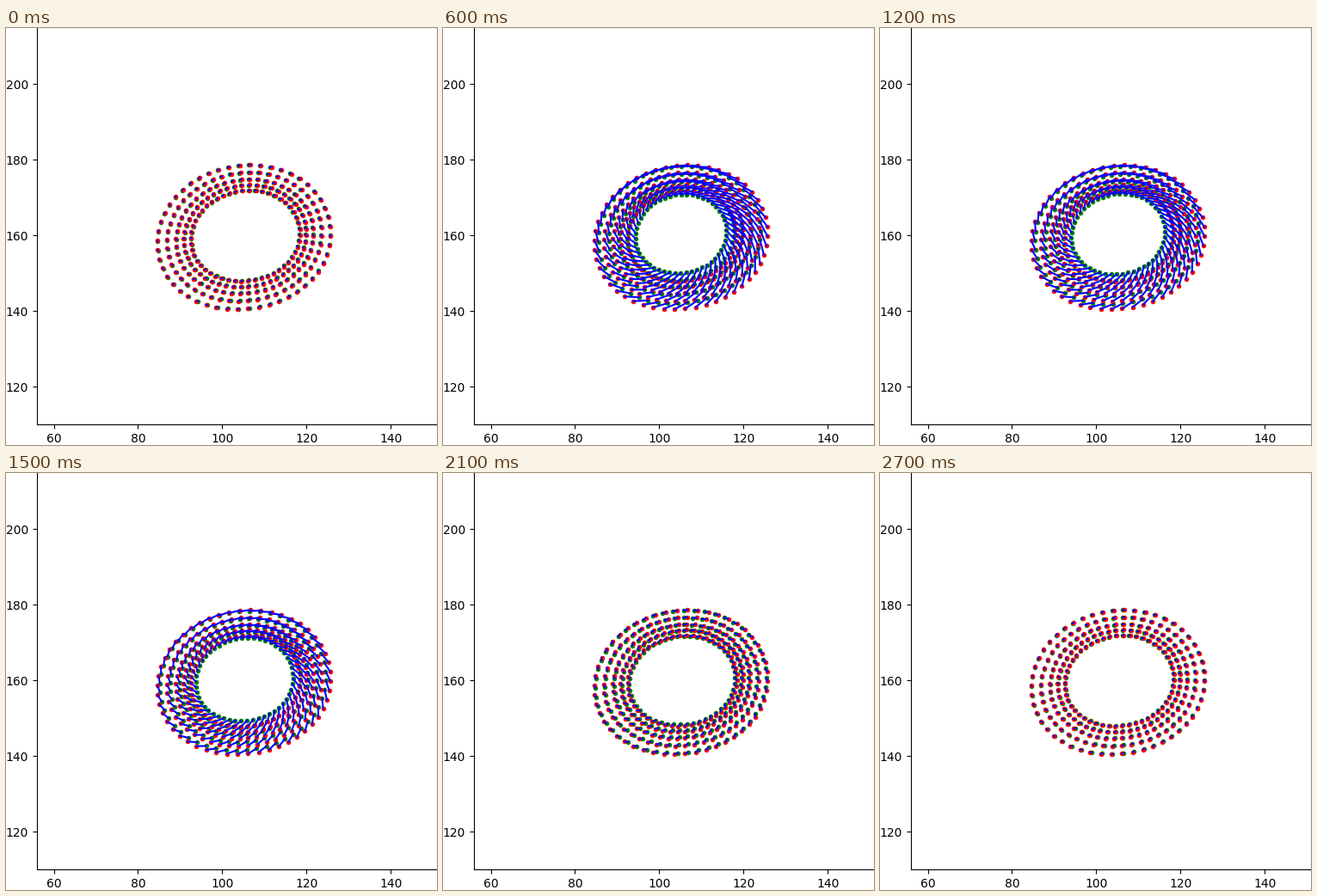
Recreate the animation shown at these times as a matplotlib script. Size 501 by 485 pixels, loop 2850 ms.

```python
import numpy as np
import matplotlib.pyplot as plt
from matplotlib.animation import FuncAnimation
from matplotlib.collections import LineCollection

W, H, DPI = 501, 485, 100
FRAMES, INTERVAL = 19, 150
LEFT, BOTTOM, AX_W, AX_H = 36, 23.7, 465, 462
X_LIM, Y_LIM = (56, 151), (110, 215)

# Outer wall contour in stage pixels, clockwise from the top.
CONTOUR = np.array([
    283.8 + 159j, 342.2 + 175.7j, 374.8 + 220j, 368.8 + 274.5j, 327.8 + 313j,
    269.3 + 327j, 210.8 + 312.5j, 178.3 + 268.5j, 184.3 + 214.8j,
    225.3 + 174j])
OUTER_CENTER, INNER_CENTER = 277.8 + 242.5j, 279 + 241.2j
INNER_SCALE = 0.632
DEPTHS = (0, 0.29, 0.56, 0.79, 1)
POINTS = 50

# Contraction over the cycle: a quick squeeze, then slow relaxation.
KEY_FRAMES = (0, 1, 2, 3, 4, 5, 6, 7, 8, 10, 12, 14, 16, 18)
KEY_LEVELS = (0.07, 0.16, 0.37, 0.62, 0.83, 0.95, 1, 0.88, 0.72,
              0.56, 0.42, 0.19, 0.1, 0.07)
SQUEEZE_X, SQUEEZE_Y = 0.38, 0.31
TWIST_OUTER, TWIST_INNER = 0.215, 0.24
DRIFT = -2.2 - 2.8j

coefs = np.fft.fft(CONTOUR - OUTER_CENTER) / len(CONTOUR)
orders = np.fft.fftfreq(len(CONTOUR), 1 / len(CONTOUR))
coefs[np.abs(orders) > 3] = 0
angles = np.arange(POINTS) * 2 * np.pi / POINTS


def contour(theta):
    return np.exp(1j * np.outer(theta, orders)) @ coefs


def to_data(z):
    x = X_LIM[0] + (z.real - LEFT) * (X_LIM[1] - X_LIM[0]) / AX_W
    y = Y_LIM[0] + (H - BOTTOM - z.imag) * (Y_LIM[1] - Y_LIM[0]) / AX_H
    return np.column_stack([x, y])


def wall(level):
    """All material points for a contraction level; 0 is the rest shape."""
    rings = []
    for depth in DEPTHS:
        center = OUTER_CENTER + depth * (INNER_CENTER - OUTER_CENTER)
        scale = 1 + depth * (INNER_SCALE - 1)
        twist = level * (TWIST_OUTER + depth * (TWIST_INNER - TWIST_OUTER))
        ring = scale * contour(angles - twist)
        # Area between rings is nearly preserved while the wall contracts.
        share = level * (INNER_SCALE / scale) ** 2
        ring = (ring.real * np.sqrt(1 - share * SQUEEZE_X)
                + 1j * ring.imag * np.sqrt(1 - share * SQUEEZE_Y))
        rings.append(center + level * DRIFT + ring)
    return to_data(np.concatenate(rings))


fig = plt.figure(figsize=((W + 1e-6) / DPI, (H + 1e-6) / DPI), dpi=DPI)
ax = fig.add_axes([LEFT / W, BOTTOM / H, AX_W / W, AX_H / H])
ax.set(xlim=X_LIM, ylim=Y_LIM,
       xticks=range(60, 141, 20), yticks=range(120, 201, 20))

rest = wall(0)
dots = dict(ls="none", marker="o", ms=4, mew=0)
moved, = ax.plot([], [], color="green", zorder=2, **dots)
ax.plot(*rest.T, color="red", zorder=3, **dots)
links = LineCollection([], colors="blue", linewidths=1.5,
                       capstyle="projecting", zorder=4)
ax.add_collection(links, autolim=False)


def update(frame):
    current = wall(np.interp(frame, KEY_FRAMES, KEY_LEVELS))
    moved.set_data(*current.T)
    links.set_segments(np.stack([rest, current], axis=1))
    return moved, links


anim = FuncAnimation(fig, update, frames=FRAMES, interval=INTERVAL,
                     repeat=True, repeat_delay=0)
plt.show()
```
